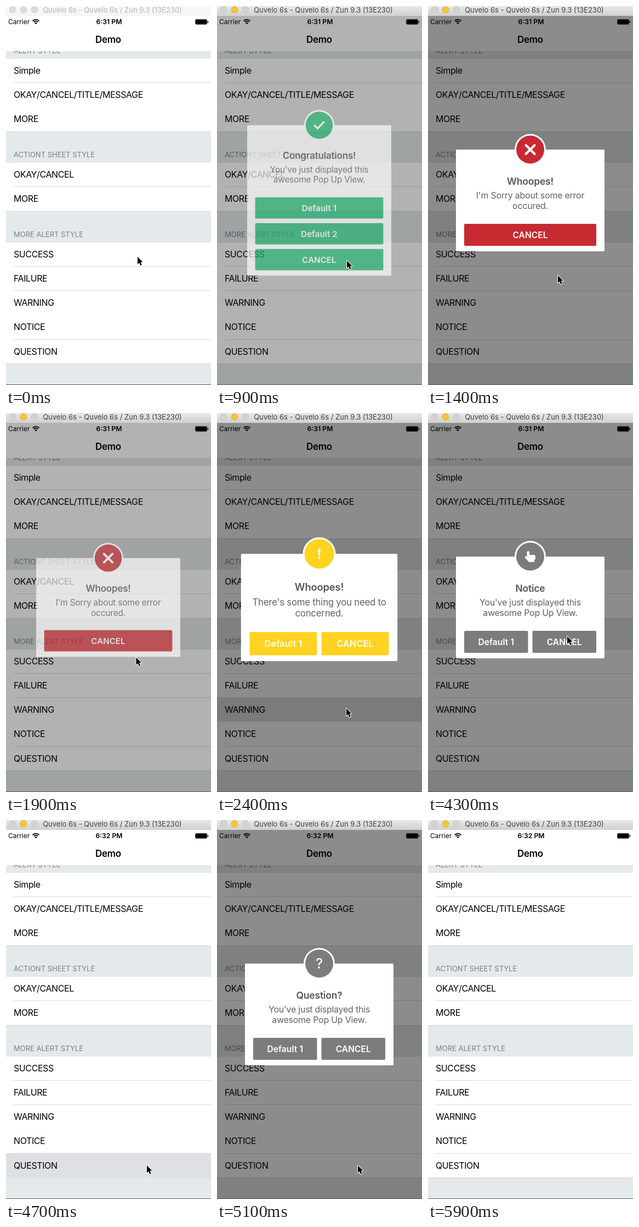
An HTML page with a canvas for the animation above (6000 ms loop, 374 by 689 pixels).

```html
<!DOCTYPE html>
<html lang="en">
<head>
<meta charset="utf-8">
<title>Alert demo</title>
<style>
  html, body { margin: 0; width: 100%; height: 100%; overflow: hidden; background: #fff; }
  canvas { display: block; }
</style>
</head>
<body>
<canvas id="stage" width="374" height="689"></canvas>
<script>
const W = 374, H = 689, LOOP = 6000, STEP = 100;
const MID_X = 186.5, MID_Y = 353.5;
const FONT = 'Inter, "Open Sans", sans-serif';

const screen = document.getElementById('stage').getContext('2d');
const layerCanvas = document.createElement('canvas');
layerCanvas.width = W;
layerCanvas.height = H;
const layer = layerCanvas.getContext('2d');

const ROWS = [
  ['Simple', 96], ['OKAY/CANCEL/TITLE/MESSAGE', 140], ['MORE', 184],
  ['OKAY/CANCEL', 285], ['MORE', 329],
  ['SUCCESS', 430], ['FAILURE', 474], ['WARNING', 518], ['NOTICE', 562], ['QUESTION', 606.5]
];
const SECTIONS = [[82, 96, 'ALERT STYLE'], [228, 285, 'ACTIONT SHEET STYLE'],
  [373, 430, 'MORE ALERT STYLE'], [650, 689, '']];
const SEPARATORS = [139, 328, 473, 517, 606];

const POPUP_TEXT = ["You've just displayed this", 'awesome Pop Up View.'];
const PAIR = ['Default 1', 'CANCEL'];
const ALERTS = [
  { open: 300, close: 800, row: 5, color: '#22b573', icon: drawCheck, title: 'Congratulations!',
    lines: POPUP_TEXT, buttons: ['Default 1', 'Default 2', 'CANCEL'], stacked: true },
  { open: 1100, close: 1800, row: 6, color: '#c82a32', icon: drawCross, title: 'Whoopes!',
    lines: ["I'm Sorry about some error", 'occured.'], buttons: ['CANCEL'] },
  { open: 2200, close: 2800, row: 7, color: '#ffd31f', icon: drawBang, title: 'Whoopes!',
    lines: ["There's some thing you need to", 'concerned.'], buttons: PAIR },
  { open: 3300, close: 4300, row: 8, color: '#7b7c7e', icon: drawHand, title: 'Notice',
    lines: POPUP_TEXT, buttons: PAIR },
  { open: 4800, close: 5500, row: 9, color: '#7b7c7e', icon: drawQuestion, title: 'Question?',
    lines: POPUP_TEXT, buttons: PAIR }
];

// time, tip x, tip y
const POINTER = [
  [0, 240, 456], [300, 240, 456], [600, 238, 460], [900, 237, 463], [1100, 237, 490],
  [1400, 237, 490], [1700, 238, 412], [1800, 238, 412], [2100, 236, 537], [2400, 236, 537],
  [2700, 250, 412], [2850, 250, 412], [3200, 252, 580], [3500, 252, 580], [4000, 254, 406],
  [4300, 254, 406], [4700, 257, 628], [5100, 257, 628], [5400, 256, 412], [5550, 256, 412],
  [5800, 330, 700]
];

function text(c, str, x, y, size, { weight = 400, color = '#000', align = 'left', spacing = 0 } = {}) {
  c.font = `${weight} ${size}px ${FONT}`;
  c.letterSpacing = spacing + 'px';
  c.textAlign = align;
  c.fillStyle = color;
  c.fillText(str, x, y);
}

function rect(c, color, x, y, w, h) {
  c.fillStyle = color;
  c.fillRect(x, y, w, h);
}

function rounded(c, color, x, y, w, h, r) {
  c.fillStyle = color;
  c.beginPath();
  c.roundRect(x, y, w, h, r);
  c.fill();
}

function disc(c, color, x, y, r) {
  c.fillStyle = color;
  c.beginPath();
  c.arc(x, y, r, 0, Math.PI * 2);
  c.fill();
}

function path(c, points) {
  c.beginPath();
  points.forEach(([x, y]) => c.lineTo(x, y));
}

function drawCheck(c) {
  path(c, [[-8.5, 0.5], [-3, 6], [8.5, -6]]);
  c.lineWidth = 3.4;
  c.stroke();
}

function drawCross(c) {
  c.lineWidth = 4;
  path(c, [[-8, -8], [8, 8]]);
  c.stroke();
  path(c, [[8, -8], [-8, 8]]);
  c.stroke();
}

function drawBang(c) {
  c.beginPath();
  c.moveTo(-0.7, 4);
  c.lineTo(-2.1, -6);
  c.bezierCurveTo(-2.5, -10.5, 2.5, -10.5, 2.1, -6);
  c.lineTo(0.7, 4);
  c.fill();
  disc(c, '#fff', 0, 7.3, 1.8);
}

function drawHand(c) {
  rounded(c, '#fff', -6, -10, 4.6, 15, 2.3);
  rounded(c, '#fff', -5, -3, 14.5, 9, 3.5);
  rounded(c, '#fff', -3.5, 3, 11, 7, 1.5);
  path(c, [[-8, 1], [-3.5, 6]]);
  c.lineWidth = 3.6;
  c.stroke();
}

function drawQuestion(c) {
  text(c, '?', 0, 9, 25, { weight: 500, color: '#fff', align: 'center' });
}

function drawTitleBar(active) {
  const shade = screen.createLinearGradient(0, 0, 0, 18);
  shade.addColorStop(0, active ? '#e9e9e9' : '#f8f8f8');
  shade.addColorStop(1, active ? '#d0d0d0' : '#f5f5f5');
  rect(screen, shade, 0, 0, W, 18);
  [12, 32, 52].forEach((x, i) => {
    const lit = active && i === 1;
    disc(screen, lit ? '#dfa023' : active ? '#bfbfbf' : '#cecece', x, 7, 6.2);
    disc(screen, lit ? '#fbc62f' : active ? '#d4d4d4' : '#dcdcdc', x, 7, 5.5);
  });
  text(screen, 'Quvelo 6s - Quvelo 6s / Zun 9.3 (13E230)', 194, 12, 13,
    { color: active ? '#404040' : '#b4b4b4', align: 'center' });
}

function drawStatusBar(clock) {
  text(screen, 'Carrier', 4, 33, 12);
  text(screen, clock, 188, 33, 12.2, { weight: 600, align: 'center' });
  screen.strokeStyle = '#000';
  screen.lineWidth = 1.7;
  for (const r of [8.4, 5.3]) {
    screen.beginPath();
    screen.arc(54.5, 33, r, -Math.PI * 0.76, -Math.PI * 0.24);
    screen.stroke();
  }
  screen.fillStyle = '#000';
  screen.beginPath();
  screen.moveTo(54.5, 33.3);
  screen.arc(54.5, 33.3, 3.2, -Math.PI * 0.76, -Math.PI * 0.24);
  screen.fill();

  screen.lineWidth = 0.8;
  screen.beginPath();
  screen.roundRect(345.4, 24.4, 21.4, 9, 2);
  screen.stroke();
  rounded(screen, '#000', 346, 25, 20.2, 7.8, 1);
  rounded(screen, '#000', 367.6, 27.2, 1.6, 3.4, 0.8);
}

function drawList(selected) {
  rect(screen, '#fff', 0, 18, W, H - 18);
  if (selected >= 0) rect(screen, '#dfe0e4', 0, ROWS[selected][1] - 1, W, 44);
  for (const y of SEPARATORS) rect(screen, '#d8d9da', 14, y, W - 14, 1);
  for (const [top, bottom, label] of SECTIONS) {
    rect(screen, '#e4e9eb', 0, top, W, bottom - top);
    if (top > 82) rect(screen, '#d0d4d5', 0, top, W, 1);
    if (bottom < H) rect(screen, '#dfe4e6', 0, bottom - 1, W, 1);
    text(screen, label, 14, bottom - 10, 13, { color: '#7c7f82' });
  }
  for (const [label, y] of ROWS) text(screen, label, 14, y + 27.3, 16, { spacing: -0.41 });
  rect(screen, '#fff', 0, 18, W, 64);
  text(screen, 'Demo', MID_X, 67, 17, { weight: 600, align: 'center', spacing: -0.3 });
}

function drawAlert({ color, icon, title, lines, buttons, stacked }, scale, alpha) {
  const c = layer, pitch = 48.5, rows = stacked ? buttons.length : 1;
  const height = 136.5 + rows * pitch, top = MID_Y - height / 2;
  c.clearRect(0, 0, W, H);
  c.save();
  c.translate(MID_X, MID_Y);
  c.scale(scale, scale);
  c.translate(-MID_X, -MID_Y);

  rounded(c, '#fff', 51, top, 271, height, 2);
  disc(c, '#fff', MID_X, top, 28.5);
  disc(c, color, MID_X, top, 25.5);
  c.save();
  c.translate(MID_X, top);
  c.fillStyle = c.strokeStyle = '#fff';
  c.lineCap = c.lineJoin = 'round';
  icon(c);
  c.restore();

  text(c, title, MID_X, top + 63.5, 17.5, { weight: 600, color: '#555', align: 'center', spacing: -0.2 });
  lines.forEach((line, i) =>
    text(c, line, MID_X, top + 89 + i * 19, 16, { color: '#626262', align: 'center', spacing: -0.25 }));

  const perRow = stacked ? 1 : buttons.length;
  const width = (241 - 8 * (perRow - 1)) / perRow;
  buttons.forEach((label, i) => {
    const x = 66 + (stacked ? 0 : i * (width + 8));
    const y = top + 135 + (stacked ? i * pitch : 0);
    rounded(c, color, x, y, width, 40, 2);
    text(c, label, x + width / 2, y + 25.6, 15.5,
      { weight: 600, color: '#fff', align: 'center', spacing: 0.1 });
  });
  c.restore();

  screen.globalAlpha = alpha;
  screen.drawImage(layerCanvas, 0, 0);
  screen.globalAlpha = 1;
}

function drawPointer(t) {
  const next = POINTER.findIndex(key => key[0] > t);
  if (next < 0) return;
  const [t0, x0, y0] = POINTER[next - 1], [t1, x1, y1] = POINTER[next];
  const p = (t - t0) / (t1 - t0), e = p * p * (3 - 2 * p);
  screen.save();
  screen.translate(x0 + (x1 - x0) * e, y0 + (y1 - y0) * e);
  path(screen, [[0, 0], [0, 13.5], [3.1, 10.7], [5.3, 15.8], [7.7, 14.8], [5.5, 9.8], [9.5, 9.6]]);
  screen.closePath();
  screen.lineJoin = 'round';
  screen.strokeStyle = '#fff';
  screen.lineWidth = 2;
  screen.stroke();
  screen.fillStyle = '#000';
  screen.fill();
  screen.restore();
}

function backOut(p) {
  const q = p - 1;
  return 1 + 2.7 * q ** 3 + 1.7 * q ** 2;
}

function render(t) {
  const picked = ALERTS.find(a => t >= a.open - 100 && t < a.open + 250);
  drawList(picked ? picked.row : -1);
  drawStatusBar(t < 4700 ? '6:31 PM' : '6:32 PM');

  const alert = ALERTS.find(a => t >= a.open && t < a.close + 300);
  if (alert) {
    const entry = Math.min(1, (t - alert.open) / 300);
    const exit = Math.max(0, (t - alert.close) / 300);
    const alpha = Math.min(1, entry * 2) * (1 - exit);
    const scale = 0.4 + 0.6 * backOut(entry) - 0.09 * exit;
    rect(screen, `rgba(0,0,0,${0.45 * alpha})`, 0, 18, W, H - 18);
    drawAlert(alert, scale, alpha);
  }
  rect(screen, '#5c5a60', 0, H - 1, W, 1);
  drawTitleBar(t >= 200);
  drawPointer(t);
}

const start = performance.now();
function tick() {
  const t = (performance.now() - start) % LOOP;
  render(Math.floor(t / STEP) * STEP);
  requestAnimationFrame(tick);
}
tick();
</script>
</body>
</html>
```
